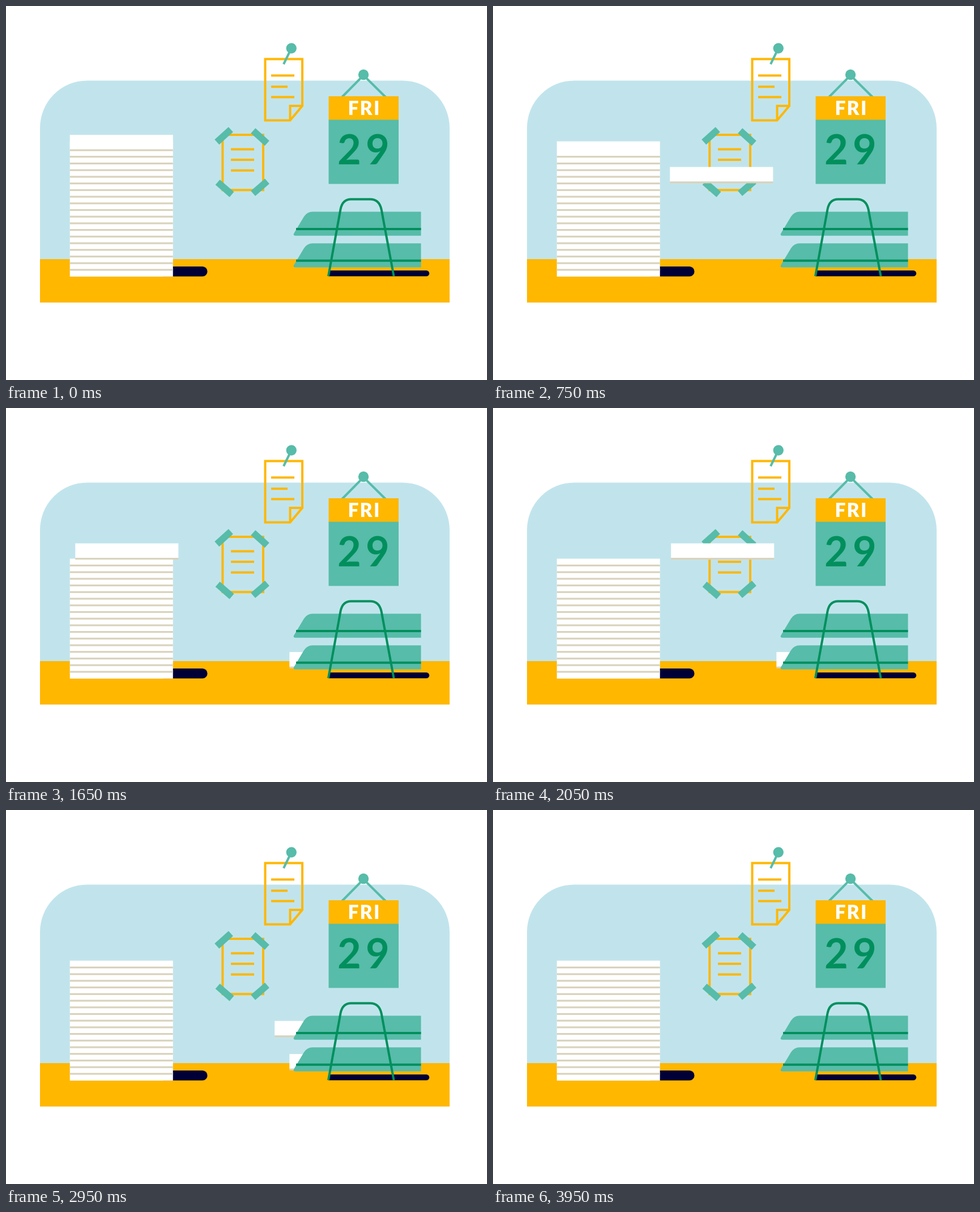
These frames come from a looping animation (849 px wide and 659 px high, 4000 ms). An HTML page:

```html
<!DOCTYPE html>
<html lang="en">
<head>
<meta charset="utf-8">
<title>Desk</title>
<style>
  html, body { margin: 0; width: 100%; height: 100%; overflow: hidden; background: #fff; }
  svg { display: block; width: 100vw; height: 100vh; }
  text { font-family: Lato, "Open Sans", sans-serif; }
  .line { fill: none; stroke-width: 4; }
  .amber { stroke: #ffb700; }
  .teal { stroke: #57bca9; }
  .green { stroke: #008f5d; }
  .round { stroke-linecap: round; }
</style>
</head>
<body>
<svg viewBox="0 0 849 659">
  <defs>
    <rect id="tape" x="-16.5" y="-6" width="33" height="12" fill="#57bca9"/>
    <g id="sheet">
      <rect width="182" height="26" fill="#fff"/>
      <rect y="25.5" width="182" height="3.2" fill="#d9d3bc"/>
    </g>
    <g id="tray">
      <path d="M732.5 362.5H541Q531.500 362.500 526 371L508 401Q506.500 404.700 511 404.700H732.500Z" fill="#57bca9"/>
      <path class="line green" d="M512 393H732.500"/>
    </g>
  </defs>

  <!-- wall and desk -->
  <path d="M60 446V215A83 83.500 0 0 1 143 131.500H700A83 83.500 0 0 1 783 215V446Z" fill="#c1e4ec"/>
  <rect x="60" y="446" width="723" height="76.500" fill="#ffb700"/>
  <rect x="270" y="459" width="85.500" height="17.500" rx="8.750" fill="#000037"/>
  <path d="M571 466H742A5 5 0 0 1 742 476.300H569Z" fill="#000037"/>

  <!-- pinned note -->
  <path class="line amber" d="M457.500 93.500H523V176L501.500 201.500H457.500ZM501.500 201.500V176H523"/>
  <path class="line amber" d="M468 122.500H509M468 142.300H497M468 160.500H509"/>
  <path class="line teal" d="M503.700 74.500L490 102.500"/>
  <circle cx="503.700" cy="74.500" r="9.200" fill="#57bca9"/>

  <!-- taped note -->
  <rect class="line amber" x="382.300" y="227" width="71.700" height="97.300"/>
  <path class="line amber" d="M397 252.500H438M397 271H438M397 289.700H438"/>
  <use href="#tape" transform="translate(384.500 228.700) rotate(-42)"/>
  <use href="#tape" transform="translate(448.500 230.800) rotate(42)"/>
  <use href="#tape" transform="translate(386 321.300) rotate(41)"/>
  <use href="#tape" transform="translate(448.500 319.500) rotate(-41)"/>

  <!-- calendar -->
  <path class="line teal" d="M593 160.500L631 122L670 160.500"/>
  <circle cx="631" cy="121" r="9.200" fill="#57bca9"/>
  <rect x="569.500" y="159" width="123.500" height="42" fill="#ffb700"/>
  <rect x="569.500" y="200.500" width="123.500" height="113" fill="#57bca9"/>
  <text x="603.500 624.500 649" y="192" font-size="33.500" font-weight="900" fill="#fff">FRI</text>
  <text x="585 635" y="279" font-size="72" font-weight="700" fill="#008f5d">29</text>

  <!-- paper stack -->
  <rect x="112.700" y="265.500" width="182" height="211.300" fill="#fff"/>
  <g id="edges" fill="#d9d3bc"></g>
  <use id="second" href="#sheet"/>
  <use id="first" href="#sheet"/>

  <!-- letter trays -->
  <use href="#tray"/>
  <use href="#tray" y="55.800"/>
  <path class="line green" d="M569 476L590.500 358Q594 340.500 609 340.500H643Q658.500 340.500 662.500 358L684.500 476"/>

  <g id="burst" class="round" stroke="#fff" stroke-width="7"></g>
</svg>
<script>
  const LOOP = 4000, STEP = 50;
  const $ = id => document.getElementById(id);
  const add = (parent, tag, attrs) => {
    const el = document.createElementNS('http://www.w3.org/2000/svg', tag);
    return set(parent.appendChild(el), attrs);
  };
  const set = (el, attrs) => {
    for (const key in attrs) el.setAttribute(key, attrs[key]);
    return el;
  };
  const phase = (t, start, end) => Math.min(1, Math.max(0, (t - start) / (end - start)));
  const ease = (t, start, end) => {
    const p = phase(t, start, end);
    return p * p * (3 - 2 * p);
  };
  const mix = (a, b, p) => a + (b - a) * p;

  for (let i = 0; i < 17; i++)
    add($('edges'), 'rect', { x: 112.7, y: 275.9 + i * 11.71, width: 182, height: 3.2 });

  const rays = Array.from({ length: 8 }, () => add($('burst'), 'line', {}));

  // Each sheet slides off the stack, then drops and curves into its tray.
  const sheets = [
    { el: $('first'), x: [112.7, 312.3, 500.3], y: [227, 430],
      slide: [20, 478], drop: [515, 1190], enter: [940, 1300] },
    { el: $('second'), x: [112.7, 314.2, 499.5], y: [238.5, 371.7],
      slide: [1590, 2045], drop: [2400, 2915], enter: [2620, 3050] }
  ];

  function draw(t) {
    for (const { el, x, y, slide, drop, enter } of sheets) {
      set(el, {
        x: mix(x[0], x[1], ease(t, ...slide)) + (x[2] - x[1]) * ease(t, ...enter),
        y: mix(y[0], y[1], ease(t, ...drop)),
        opacity: 1 - phase(t, 3300, 3800)
      });
    }

    const grow = ease(t, 3200, 3400);
    set($('burst'), { opacity: t > 3200 ? 0.65 * (1 - phase(t, 3400, 3850)) : 0 });
    rays.forEach((ray, i) => {
      const angle = i * Math.PI / 4 - 0.01;
      const inner = mix(25, 54, grow), outer = mix(28, i % 2 ? 80 : 99, grow);
      const cos = Math.cos(angle), sin = Math.sin(angle);
      set(ray, {
        x1: 525 + inner * cos, y1: 448 + inner * sin,
        x2: 525 + outer * cos, y2: 448 + outer * sin
      });
    });
  }

  function frame() {
    const t = performance.now() % LOOP;
    draw(Math.floor(t / STEP) * STEP);
    requestAnimationFrame(frame);
  }
  frame();
</script>
</body>
</html>
```
